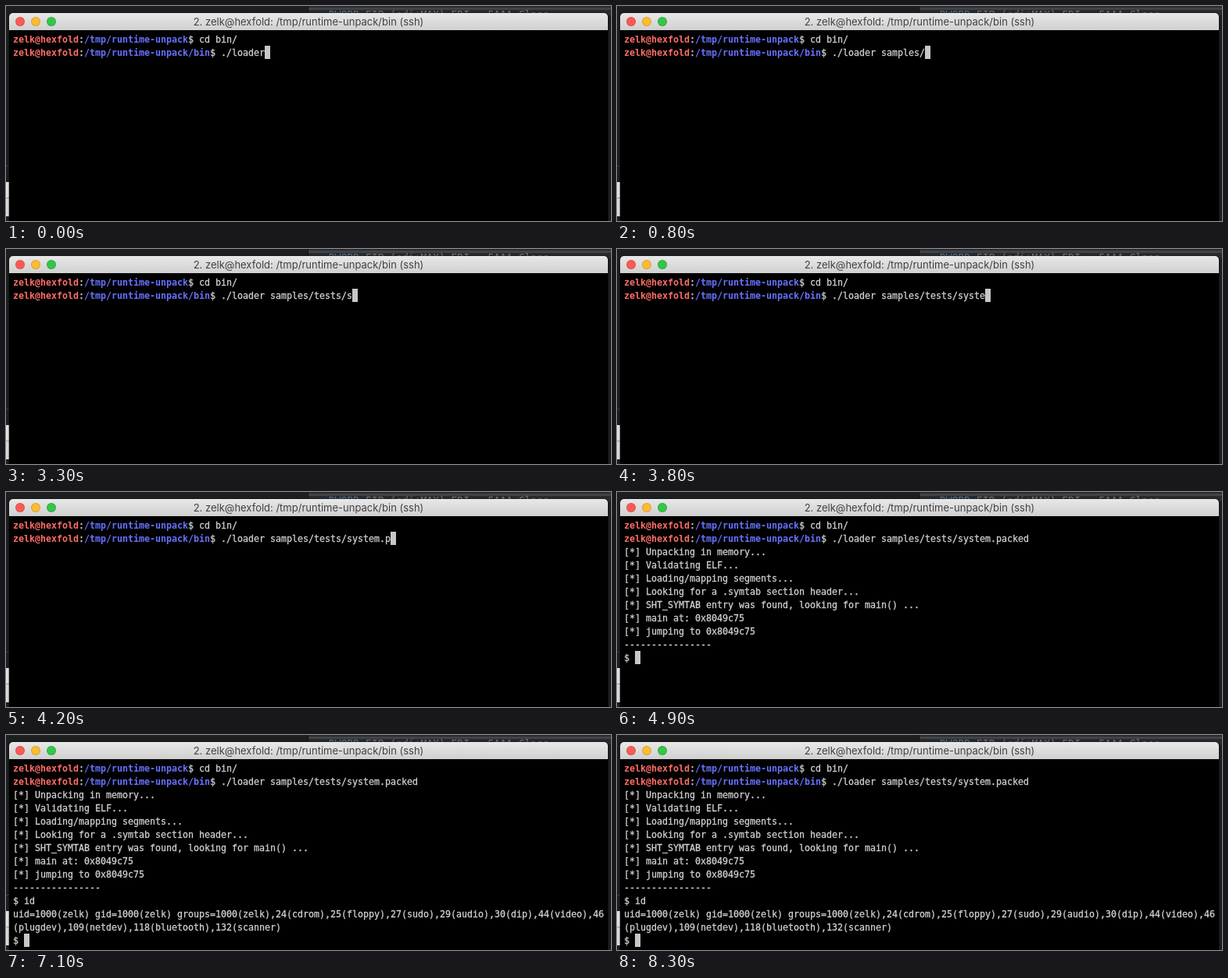
Recreate the animation shown at these times as an HTML page. Size 774 px wide and 276 px high, loop 8.4 s.

```html
<!DOCTYPE html>
<html lang="en">
<head>
<meta charset="utf-8">
<title>Terminal session</title>
<style>
  html, body { margin: 0; width: 100%; height: 100%; overflow: hidden; background: #1d1e20; }
  .stage { position: relative; width: 774px; height: 276px; overflow: hidden; background: #1d1e20; }
  .stage > * { position: absolute; }

  .editor { left: 386px; top: 0; width: 388px; height: 12px; background: #292a2d; border-left: 1px solid #111; }
  .editor i { position: absolute; left: 0; top: 2px; width: 100%; height: 3px; background: #424346; }
  .editor code { position: absolute; left: 26px; top: 2px; font: 13px/17px "DejaVu Sans Mono", monospace; color: #74787c; white-space: pre; }
  .editor b { font-weight: 400; color: #55799a; }
  .panel { left: 0; top: 226px; width: 5px; height: 44px; background: linear-gradient(#e4e4e4 20px, #999 20px 21px, #dcdcdc 21px); }
  .rule { left: 0; top: 205px; width: 5px; height: 1px; background: #3a3b3d; }

  .window { left: 4px; top: 9px; width: 766px; height: 267px; background: #000; border-radius: 5px 5px 0 0; box-shadow: 0 0 2px #000; overflow: hidden; }
  .bar { height: 22px; background: linear-gradient(#e8e8e8, #d0d0d0);
         font: 13px/22px Inter, sans-serif; color: #414141; text-align: center; white-space: pre; }
  .bar i { position: absolute; top: 5px; width: 12px; height: 12px; border-radius: 50%; box-shadow: inset 0 0 0 1px #0002; }
  .close { left: 8px; background: #fb5a55; }
  .mini { left: 28px; background: #fbbb32; }
  .zoom { left: 48px; background: #35c649; }

  pre { left: 9px; top: 35px; margin: 0; font: 11.63px/17px "DejaVu Sans Mono", monospace; color: #d0d0d0; -webkit-text-stroke: .3px; }
  .host { color: #ff6e67; font-weight: 700; }
  .path { color: #6871ff; font-weight: 700; }
  .host, .path { -webkit-text-stroke: 0; }
  .cursor { display: inline-block; width: 7px; height: 17px; margin-top: -1px; vertical-align: top; background: #c7c7c7; }
</style>
</head>
<body>
<div class="stage">
  <div class="editor"><i></i><code><b>DWORD</b> EIP (edi+MAX) EDI = 5AAA Class</code></div>
  <div class="panel"></div>
  <div class="rule"></div>
  <div class="window">
    <div class="bar"><i class="close"></i><i class="mini"></i><i class="zoom"></i>2. zelk@hexfold: /tmp/runtime-unpack/bin (ssh)</div>
  </div>
  <pre><span class="host">zelk@hexfold</span>:<span class="path">/tmp/runtime-unpack</span>$ cd bin/
<span class="host">zelk@hexfold</span>:<span class="path">/tmp/runtime-unpack/bin</span>$ <span id="session"></span><span class="cursor"></span></pre>
</div>
<script>
  const LOOP = 8400;

  const loaderOutput = `
[*] Unpacking in memory...
[*] Validating ELF...
[*] Loading/mapping segments...
[*] Looking for a .symtab section header...
[*] SHT_SYMTAB entry was found, looking for main() ...
[*] main at: 0x8049c75
[*] jumping to 0x8049c75
----------------
$ `;

  const idOutput = `
uid=1000(zelk) gid=1000(zelk) groups=1000(zelk),24(cdrom),25(floppy),27(sudo),29(audio),30(dip),44(video),46
(plugdev),109(netdev),118(bluetooth),132(scanner)
$ `;

  // Each entry appends text to the session at the given time in ms.
  const typed = (start, step, text) => [...text].map((char, i) => [start + i * step, char]);
  const events = [
    [0, "./loader"],
    [100, " "],
    ...typed(400, 100, "sam"),
    [800, "ples/"],
    ...typed(1200, 100, "te"),
    ...typed(1500, 100, "sts/"),
    ...typed(3300, 100, "syste"),
    ...typed(3900, 100, "m."),
    ...typed(4200, 100, "packe"),
    [4600, "d"],
    [4800, loaderOutput],
    ...typed(6300, 100, "id"),
    [6700, idOutput],
  ];

  const session = document.getElementById("session");

  function draw() {
    const time = performance.now() % LOOP;
    const text = events.filter(([at]) => at <= time).map(([, part]) => part).join("");
    if (session.textContent !== text) session.textContent = text;
    requestAnimationFrame(draw);
  }
  draw();
</script>
</body>
</html>
```
